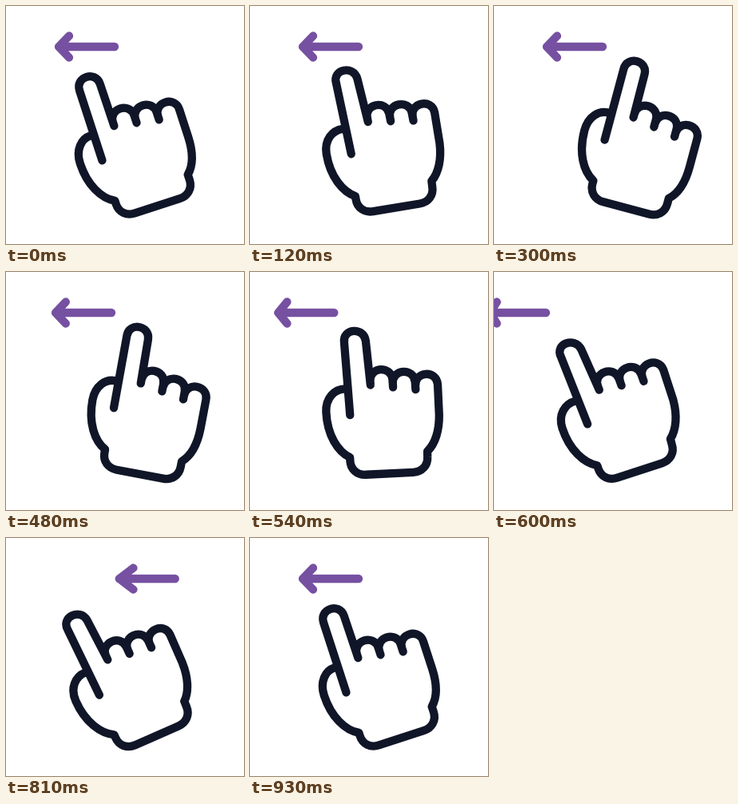
Write an HTML page that moves like this. It is 298 by 298 pixels and loops after 1.11 s.

```html
<!DOCTYPE html>
<html>
<head>
<meta charset="utf-8">
<style>
html, body { margin: 0; height: 100%; overflow: hidden; background: #fff; }
svg { display: block; width: 100%; height: 100%; }
path { fill: none; stroke-width: 10.3; stroke-linecap: round; stroke-linejoin: round; }
.arrow { stroke: #7650a1; }
#hand { stroke: #101628; }
</style>
</head>
<body>
<svg viewBox="0 0 298 298">
  <path class="arrow"/>
  <path class="arrow"/>
  <path id="hand"/>
</svg>
<script>
const LOOP = 1110, STEP = 30;
const arrows = document.querySelectorAll('.arrow');
const hand = document.getElementById('hand');

// Upright hand, relative to its pivot in the palm
const outline = `M-44.5 -33 L-44.5 -125 C-44.5 -143 -17.5 -143 -17.5 -125 L-17 -69.5
  L-17 -74 C-17 -92.5 11 -92.5 11 -74 L11 -64.5
  L11 -69 C11 -87.5 39 -87.5 39 -69 L39 -59.5
  L39 -64 C39 -82.5 67 -82.5 67 -64 L67 -28 C67 -9 62 8 52 17
  L52 24 C52 35 44 42.5 33 42.5 L-26 42.5 C-37 42.5 -45 35 -45 24 L-45 20
  C-60 12 -72 -9 -72 -38 C-72 -56 -61 -67 -49 -67`;

const span = (t, a, b) => Math.min(1, Math.max(0, (t - a) / (b - a)));
const smooth = p => p * p * (3 - 2 * p);

// Bends the fingers sideways, then turns and places the hand
function pose(angle, bow, shift) {
  const c = Math.cos(angle * Math.PI / 180), s = Math.sin(angle * Math.PI / 180);
  return outline.replace(/(-?[\d.]+) (-?[\d.]+)/g, (_, a, b) => {
    const x = +a, y = +b, low = Math.min(y, 20);
    const bend = bow * span(x, -72, -45);
    const u = x + bend * (20 - low) * (low + 116) / 4624;
    const v = y - (y < -40 ? bend * 0.012 * (x + 10) : 0);
    return (173 + shift + u * c - v * s).toFixed(2) + ' ' +
           (211 + shift * 0.25 + u * s + v * c).toFixed(2);
  });
}

// The head lags behind its tip the further the arrow is from rest
function placeArrow(arrow, dx) {
  const tip = 66 + dx, back = tip + 13 + dx / 16;
  arrow.setAttribute('d', `M${tip + 70} 51H${tip}M${back} 37.5L${tip} 51L${back} 64.5`);
}

function draw(t) {
  const back = smooth(span(t, 30, 300));
  const p = span(t, 450, 670);
  const swipe = (p + smooth(p)) / 2;
  const rest = smooth(span(t, 670, 930));
  const push = swipe * (1 - rest);

  const angle = -18 + 33 * back - 46 * swipe + 13 * rest;
  const bow = 4.5 * Math.sin(Math.PI * back) + 6 * push;
  hand.setAttribute('d', pose(angle, bow, -10 * push));

  placeArrow(arrows[0], -142 * smooth(span(t, 450, 750)));
  placeArrow(arrows[1], 252 * (1 - smooth(span(t, 600, 930))));
}

const start = performance.now();
function tick() {
  const t = (performance.now() - start) % LOOP;
  draw(Math.floor(t / STEP) * STEP);
  requestAnimationFrame(tick);
}
tick();
</script>
</body>
</html>
```
